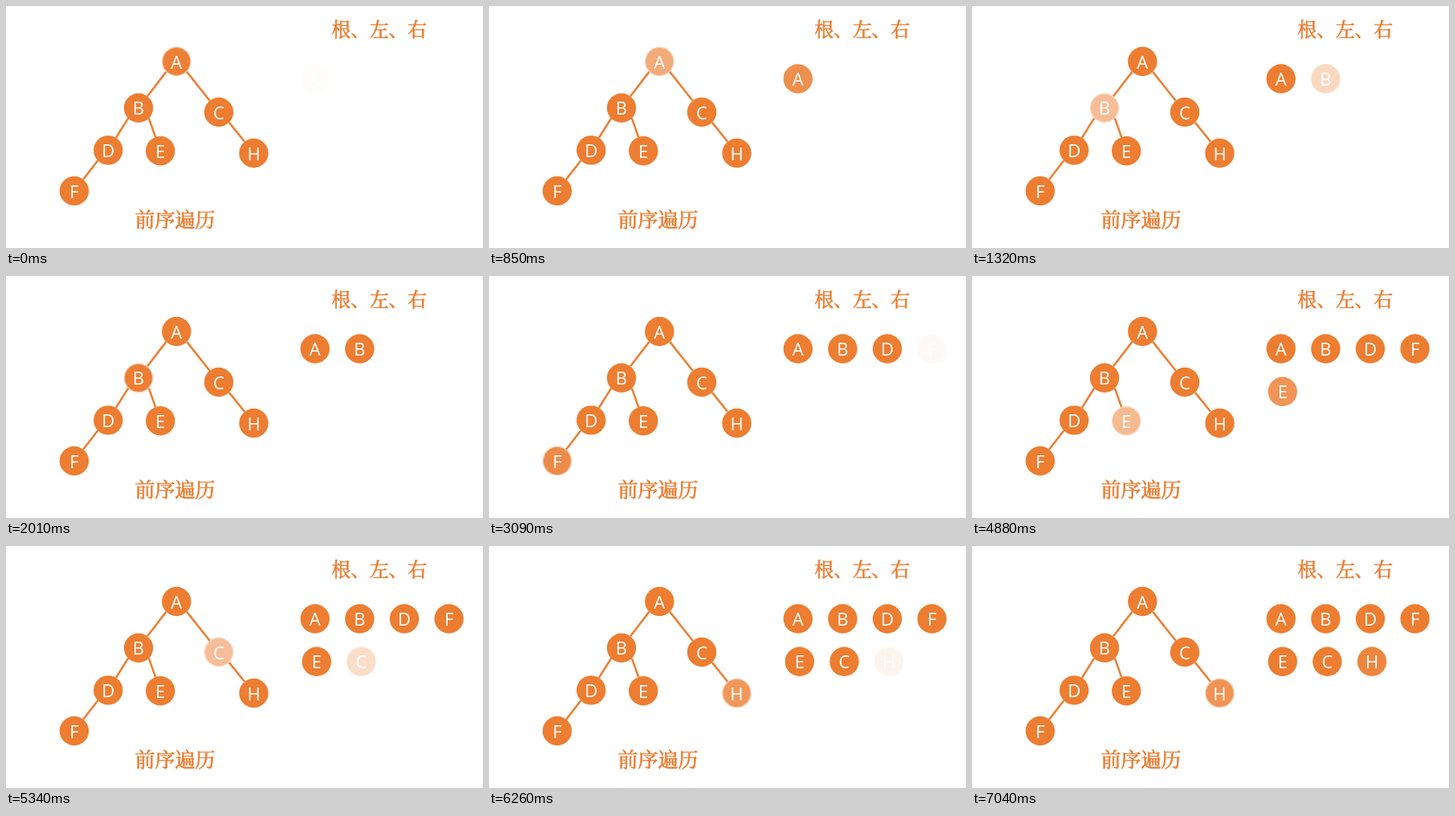
These frames come from a looping animation (594 by 301 pixels, 7210 ms). An HTML page with a canvas:

```html
<!DOCTYPE html>
<html lang="zh-CN">
<head>
<meta charset="utf-8">
<title>前序遍历</title>
<style>
  html, body { margin: 0; width: 100%; height: 100%; overflow: hidden; background: #fff; }
  canvas { display: block; }
</style>
</head>
<body>
<canvas id="stage" width="594" height="301"></canvas>
<script>
const ctx = document.getElementById('stage').getContext('2d');
const ORANGE = '#ed7d31', RADIUS = 18.2;
const LOOP = 7210, STEP = 77;
const PAUSE = 3090, RESUME = 3840, RESUME_ORIGIN = 3798;
const FIRST = -12, GAP = 1019, FADE = 1000;

const tree = {
  name: 'A', x: 212.3, y: 69,
  children: [
    { name: 'B', x: 165, y: 126.8, children: [
      { name: 'D', x: 127.2, y: 179.4, children: [{ name: 'F', x: 84.9, y: 230 }] },
      { name: 'E', x: 192.2, y: 180.2 }
    ] },
    { name: 'C', x: 265, y: 132, children: [{ name: 'H', x: 308.5, y: 183 }] }
  ]
};

const preorder = node => [node, ...(node.children || []).flatMap(preorder)];
const visits = preorder(tree);

const clamp = v => Math.min(1, Math.max(0, v));

// The picture advances in even steps and rests once in the middle
function stepTime(t) {
  if (t >= PAUSE && t < RESUME) return PAUSE;
  const origin = t < PAUSE ? 0 : RESUME_ORIGIN;
  return origin + Math.floor((t - origin) / STEP) * STEP;
}

function listPlace(i) {
  const row = Math.floor(i / 4), col = i % 4;
  return [384.8 + 55.6 * col + 2 * row, 90.5 + 53.3 * row];
}

function disc(x, y, r, alpha) {
  ctx.globalAlpha = alpha;
  ctx.fillStyle = ORANGE;
  ctx.beginPath();
  ctx.arc(x, y, r, 0, Math.PI * 2);
  ctx.fill();
  ctx.globalAlpha = 1;
}

function drawNode(name, x, y, alpha, scale = 1) {
  if (alpha <= 0) return;
  const r = RADIUS * scale;
  if (scale > 1) {
    // a pulsing node has a paler rim
    const rim = alpha * 0.5;
    disc(x, y, r, rim);
    disc(x, y, r - 1.3, (alpha - rim) / (1 - rim));
  } else {
    disc(x, y, r, alpha);
  }
  ctx.fillStyle = '#fff';
  ctx.textAlign = 'center';
  ctx.font = `${22 * scale}px "Open Sans", "Noto Sans", sans-serif`;
  ctx.fillText(name, x, y + 8.5 * scale);
}

// From the parent's lower diagonal point to the child's rim
function drawEdge(parent, child) {
  const reach = RADIUS * Math.SQRT1_2;
  const x = parent.x + reach * Math.sign(child.x - parent.x);
  const y = parent.y + reach;
  const angle = Math.atan2(child.y - y, child.x - x);
  ctx.beginPath();
  ctx.moveTo(x, y);
  ctx.lineTo(child.x - RADIUS * Math.cos(angle), child.y - RADIUS * Math.sin(angle));
  ctx.stroke();
}

function drawTitle(text, x, y, size) {
  ctx.fillStyle = ORANGE;
  ctx.textAlign = 'left';
  ctx.font = `${size}px "Noto Serif CJK SC", "Noto Sans CJK SC", serif`;
  ctx.fillText(text, x, y);
  ctx.lineWidth = 0.7;
  ctx.strokeText(text, x, y);
}

function draw(t) {
  ctx.fillStyle = '#fff';
  ctx.fillRect(0, 0, 594, 301);

  ctx.strokeStyle = ORANGE;
  ctx.lineWidth = 2.5;
  for (const node of visits) {
    for (const child of node.children || []) drawEdge(node, child);
  }

  visits.forEach(({ name, x, y }, i) => {
    const p = clamp((t - FIRST - i * GAP) / FADE);
    const near = Math.min(p, 1 - p);
    const dip = 0.5 * clamp(near / 0.2);
    drawNode(name, x, y, 1 - dip, 1 + 0.05 * near);
    drawNode(name, ...listPlace(i), p);
  });

  drawTitle('根、左、右', 405.5, 38.3, 23.7);
  drawTitle('前序遍历', 160.5, 275.3, 25);
}

function frame() {
  draw(stepTime(performance.now() % LOOP));
  requestAnimationFrame(frame);
}
frame();
</script>
</body>
</html>
```
